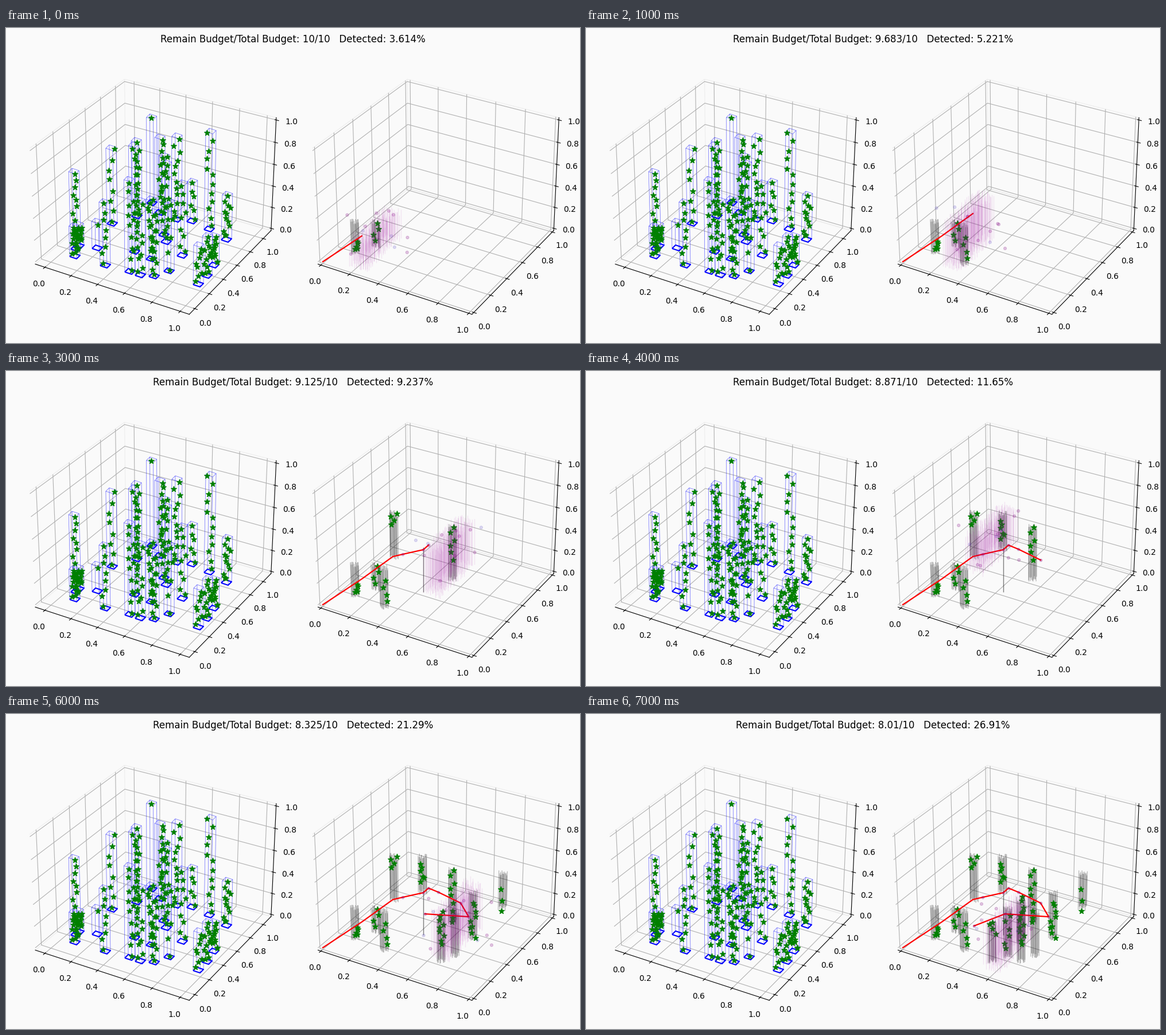
A matplotlib script that plays this animation: 1000x550 px, repeating every 8000 ms.

```python
import numpy as np
import matplotlib.pyplot as plt
from matplotlib.animation import FuncAnimation
from matplotlib.collections import LineCollection

W, H, DPI = 1000, 550, 100
rng = np.random.default_rng(4)

plt.rcParams["font.family"] = "DejaVu Sans"
fig = plt.figure(figsize=(W / DPI, H / DPI), dpi=DPI, facecolor="#fafafa")
title = fig.suptitle("", fontsize=12)


def cube(left, xlim, ylim):
    """Empty 3D axes filling a square of 477.5 px."""
    ax = fig.add_axes([left / W, 20 / H, 477.5 / W, 477.5 / H],
                      projection="3d", facecolor="none")
    ax.set_xlim(*xlim, view_margin=0)
    ax.set_ylim(*ylim, view_margin=0)
    ax.set_zlim(*UNIT, view_margin=0)
    for axis in (ax.xaxis, ax.yaxis, ax.zaxis):
        axis.set_ticks(np.linspace(0, 1, 6))
        axis.pane.set_facecolor("none")
        axis.pane.set_edgecolor((0.9, 0.9, 0.9, 0.5))


UNIT = (-1 / 48, 49 / 48)
cube(15, (-0.075, 1.064), (-0.074, 1.125))
cube(507.5, UNIT, UNIT)

# Transparent layer in stage pixels, y pointing down
stage = fig.add_axes([0, 0, 1, 1], facecolor="none")
stage.set(xlim=(0, W), ylim=(H, 0))
stage.axis("off")


def lines(segments, color, width, alpha, z):
    return stage.add_collection(LineCollection(
        segments, colors=color, linewidths=width, alpha=alpha, zorder=z))


def star_stack(x, top, bottom, count, spread=6):
    """Stars spread evenly in height with a little jitter."""
    y = np.linspace(top, bottom, count) + rng.uniform(-3, 3, count)
    return stage.scatter(x + rng.uniform(-spread, spread, count), y, s=50,
                         marker="*", color="green", zorder=3)


# Base x, base y, top y and, where it is not the usual one, star count
TARGETS = [
    (120, 398, 345), (122, 385, 250), (127, 380, 342), (159, 384, 337, 1),
    (173, 414, 303, 8), (185, 341, 209, 8), (228, 328, 196), (224, 390, 204),
    (216, 425, 264, 9), (234, 431, 300), (258, 433, 320), (284, 424, 302, 5),
    (253, 403, 298), (254, 305, 155, 2), (268, 322, 190), (275, 361, 222),
    (279, 373, 235, 8), (297, 334, 188), (324, 337, 267, 6),
    (307, 397, 270, 9), (354, 351, 180), (384, 369, 290), (335, 447, 378, 8),
    (350, 432, 362), (362, 414, 362),
]
SQUARE = np.array([(-9, 1), (-3, -5), (9, -1), (3, 5)])


def lean(x, rise):
    return (x - 265) * rise * 2e-4


bases, edges = [], []
for x, y, top, *count in TARGETS:
    base = SQUARE + (x, y)
    lid = SQUARE + (x + lean(x, y - top), top)
    bases.append(np.vstack([base, base[:1]]))
    edges.append(np.vstack([lid, lid[:1]]))
    edges += list(np.stack([base, lid], axis=1))
    star_stack(x + lean(x, y - top) / 2, top + 5, y - 4,
               count[0] if count else 12)
lines(bases, "blue", 1.5, 1, 2)
lines(edges, "blue", 0.5, 0.6, 2)


def scan(x, y, height):
    """Slab of thin vertical strokes; (x, y) is its lower left corner."""
    u, v = np.meshgrid(np.linspace(0, 1, 8), np.linspace(0, 1, 21))
    u, v = u.ravel(), v.ravel()
    px = x + 28 * u + 60 * v + rng.uniform(-1, 1, u.size)
    low = y + 10 * u - 58 * v + rng.uniform(-3, 5, u.size)
    high = low - height - rng.uniform(-2, 6, u.size)
    return lines([[(a, b), (a, c)] for a, b, c in zip(px, low, high)],
                 "#a000a0", 1, 0.085, 6)


def samples(x, y, height):
    """Faint dots scattered around a slab."""
    px = x + 44 + rng.uniform(-60, 65, 11)
    py = y - 24 - height / 2 + rng.uniform(-50, 50, 11)
    tint = np.where(np.arange(11) % 4 == 0, "slateblue", "purple")
    return stage.scatter(px, py, s=12, c=tint, alpha=0.2, zorder=4)


def column(x, top, bottom):
    """Bundle of faint black strokes left where something was detected."""
    px = np.linspace(x - 7, x + 7, 16) + rng.uniform(-0.6, 0.6, 16)
    return lines([[(a + lean(a - 492.5, 60), top + rng.uniform(0, 10)),
                   (a, bottom - rng.uniform(0, 10))] for a in px],
                 "black", 1, 0.24, 2)


kept, passing, captions, paths = [], [], [], []
route = [(552, 408)]


def step(budget, percent, way, slab, *columns):
    """One move; a column is x, top, bottom, star top, star bottom, count."""
    i = len(captions)
    captions.append(f"Remain Budget/Total Budget: {budget}/10   "
                    f"Detected: {percent}%")
    route.extend(way)
    paths.append(np.array(route))
    for x, top, bottom, *hits in columns:
        kept.append((i, column(x, top, bottom)))
        kept.append((i, star_stack(x, *hits)))
    passing.append((i, scan(*slab)))
    passing.append((i, samples(*slab)))


step("10", "3.614", [(620, 363)], (599, 414, 45),
     (609, 333, 396, 372, 388, 5), (645, 333, 385, 340, 371, 4))
step("9.683", "5.221", [(674, 324)], (622, 415, 75),
     (659, 338, 417, 365, 402, 4))
step("9.361", "6.827", [(691, 320), (727, 312)], (600, 348, 56),
     (676, 242, 330, 247, 267, 4))
step("9.125", "9.237", [(736, 304)], (727, 385, 76),
     (778, 266, 368, 271, 327, 6))
kept.append((3, lines([[(727, 308), (727, 386)]], "black", 1, 0.5, 2)))
step("8.871", "11.65", [(753, 311), (792, 330)], (662, 345, 58),
     (726, 243, 316, 262, 294, 6))
step("8.602", "16.47", [(806, 354)], (793, 397, 75),
     (813, 306, 396, 329, 391, 9), (865, 272, 344, 306, 341, 3))
step("8.325", "21.29", [(730, 349)], (741, 422, 76),
     (758, 348, 436, 346, 403, 9), (782, 340, 426, 345, 366, 3))
step("8.01", "26.91", [(676, 370)], (693, 440, 76),
     (708, 360, 436, 362, 382, 4), (735, 335, 428, 352, 410, 6),
     (758, 318, 400, 320, 345, 4))

path, = stage.plot([], [], color="red", lw=1.6, zorder=4)
nodes = stage.scatter([], [], s=10, color="purple", alpha=0.25, zorder=5)


def update(i):
    title.set_text(captions[i])
    path.set_data(*paths[i].T)
    nodes.set_offsets(paths[i][3:])
    for start, artist in kept:
        artist.set_visible(start <= i)
    for start, artist in passing:
        artist.set_visible(start == i)


anim = FuncAnimation(fig, update, frames=len(captions), interval=1000,
                     repeat=True, repeat_delay=0, init_func=lambda: None,
                     blit=False)
plt.show()
```
